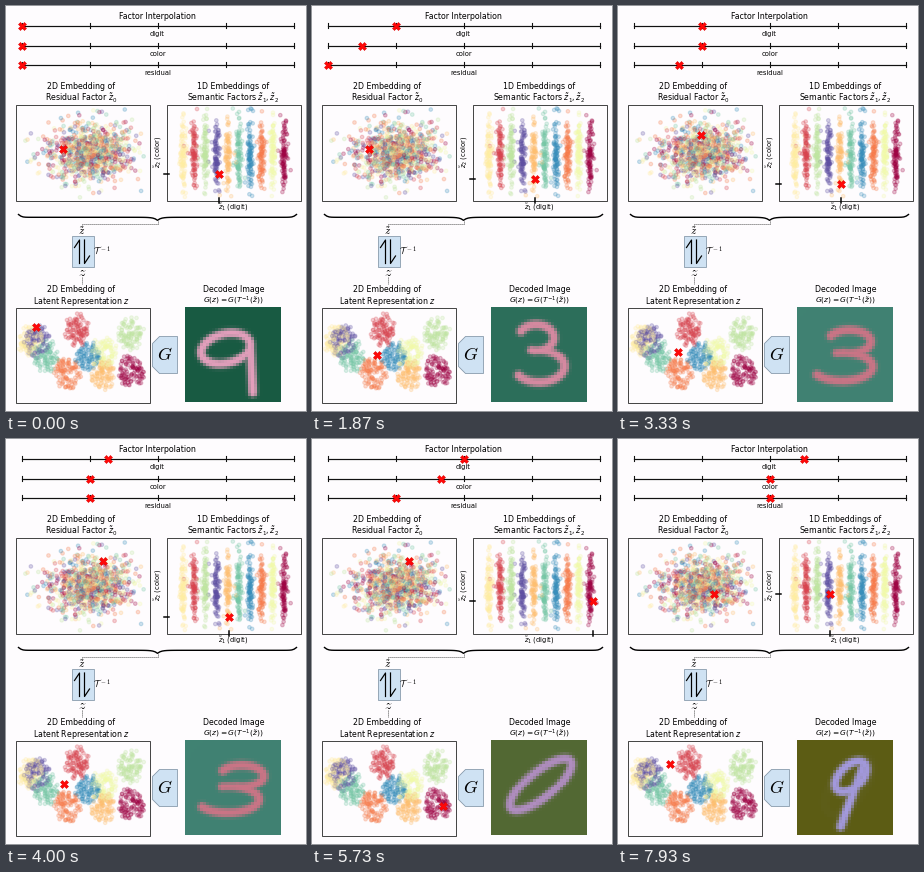
Animation of 300 by 405 pixels, one loop 8000 ms. Source, as a matplotlib script:

```python
import numpy as np
import matplotlib.pyplot as plt
from matplotlib.animation import FuncAnimation
from matplotlib.patches import Polygon, Rectangle

W, H, DPI = 300, 405, 100
FRAMES, LOOP = 120, 8000
STEPS = 18                       # frames per slider segment
PT = 72 / DPI                    # points per pixel
PAPER, INK = "#fefcfe", "#111111"

rng = np.random.default_rng(4)
fig = plt.figure(figsize=(W / DPI, H / DPI), dpi=DPI, facecolor=PAPER)
ax = fig.add_axes([0, 0, 1, 1])
ax.axis("off")


def text(x, y, s, px=7.85, **kw):
    kw = {"ha": "center", "va": "center", "color": "black", **kw}
    return ax.text(x, y, s, fontsize=px * PT, family="DejaVu Sans", **kw)


def line(xs, ys, lw=1.0, color=INK, **kw):
    return ax.plot(xs, ys, color=color, lw=lw * PT, **kw)[0]


def dots(x, y, labels, box):
    x0, y0, x1, y1 = box
    ok = (x > x0 + 3) & (x < x1 - 3) & (y > y0 + 3) & (y < y1 - 3)
    order = rng.permutation(np.flatnonzero(ok))
    ax.scatter(x[order], y[order], s=(3.6 * PT) ** 2, c=labels[order],
               cmap="Spectral", alpha=0.25, linewidths=1.1 * PT, zorder=2)
    ax.add_patch(Rectangle((x0, y0), x1 - x0, y1 - y0, fill=False,
                           ec="#333333", lw=0.9 * PT, zorder=4))


def cross(x=0, y=0):
    return ax.plot([x], [y], marker="X", ms=8.2 * PT, mfc="#ff0808",
                   mec="#e00000", mew=0.5 * PT, ls="none", zorder=8)[0]


# sliders
ROWS = (19, 39, 58)
text(151, 10, "Factor Interpolation")
for y, name in zip(ROWS, ("digit", "color", "residual")):
    line([15, 287], [y, y], 1.2)
    for t in range(15, 288, 68):
        line([t, t], [y - 2.5, y + 2.5], 1.1)
    text(151, y + 8.2, name, 6.8)

# scatter plots
N = 100
labels = np.repeat(np.arange(10), N)


def normal(sd, tail=0.0, wide=1.0):
    """Gaussian noise in which a share of the points spreads wider."""
    scale = np.where(rng.random(10 * N) < tail, wide, 1)
    return sd * scale * rng.normal(size=10 * N)


text(75, 80, "2D Embedding of")
text(75, 91.5, r"Residual Factor $\tilde{z}_0$")
dots(84 + normal(19, 0.25, 1.7), 146 + normal(13, 0.25, 1.6), labels,
     (9, 98, 143, 194))

text(227, 80, "1D Embeddings of")
text(227, 91.5, r"Semantic Factors $\tilde{z}_1, \tilde{z}_2$")
column = {d: 176.5 + 11.2 * k for k, d in enumerate("4169378250")}
dots(np.array([column[str(d)] for d in labels]) + normal(1.5, 0.03, 4),
     147 + normal(18.5), labels, (160, 98, 294, 194))
text(152, 145, r"$\tilde{z}_2$ (color)", 6.8, rotation=90)
text(227, 201, r"$\tilde{z}_1$ (digit)", 6.8)

text(75, 283, "2D Embedding of")
text(75, 294.5, r"Latent Representation $z$")
centers = np.array([(125, 365), (71, 324), (61, 367), (96, 369), (24, 334),
                    (97, 346), (124, 327), (39, 349), (82, 350), (30, 334)])
cx, cy = centers[labels].T
ang = rng.uniform(0, 2 * np.pi, 10 * N)
rad = np.sqrt(rng.random(10 * N)) * rng.uniform(0.8, 1.15, 10 * N)
dots(cx + 12.5 * rad * np.cos(ang), cy + 15.5 * rad * np.sin(ang), labels,
     (9, 301, 143, 396))

# brace and connectors
u = np.linspace(0, 139, 60)
half = 208 + 2.8 * np.tanh(u / 3.5) + 3 * np.exp((u - 139) / 3.5)
line(np.r_[12 + u, 290 - u[::-1]], np.r_[half, half[::-1]], 1.4, "black")
DOTTED = dict(lw=0.8, color="#555555", ls=(0, (1.5, 1)))
line([151, 151, 75.5, 75.5], [214, 217, 217, 220], **DOTTED)
line([75.5, 75.5], [270, 277], **DOTTED)
CM = dict(math_fontfamily="cm")
text(75.5, 225, r"$\tilde{z}$", 11, **CM)
text(75.5, 266, r"$z$", 14, **CM)
text(96, 244, r"$\mathcal{T}^{\,-1}$", 9, **CM)

# invertible map and generator
BLOCK = dict(fc="#cfe2f3", ec="#8497a8", lw=0.8 * PT)
ax.add_patch(Rectangle((65, 229.5), 22, 31, **BLOCK))
line([68, 73, 73], [241, 233.5, 257], 1.2, "black")
line([78, 78, 83], [233.5, 257, 249.5], 1.2, "black")
ax.add_patch(Polygon([(146, 337), (153, 330), (171, 330), (171, 367),
                      (153, 367), (146, 360)], **BLOCK))
text(158.5, 348.5, r"$G$", 18, **CM)

# decoded image
text(227, 283, "Decoded Image")
text(227, 294.5, r"$G(z) = G(T^{-1}(\tilde{z}))$", 7.5)
GRID = 32
X0, X1, Y0, Y1 = 178.5, 274, 300.5, 395.5
cell = (np.arange(GRID) + 0.5) / GRID
gx, gy = np.meshgrid(X0 + cell * (X1 - X0), Y0 + cell * (Y1 - Y0))


def arc(x, y, a, b, start=0, stop=360, tilt=0):
    t, r = np.radians(np.linspace(start, stop, 60)), np.radians(tilt)
    c, s = a * np.cos(t), b * np.sin(t)
    return np.column_stack([x + c * np.cos(r) - s * np.sin(r),
                            y + c * np.sin(r) + s * np.cos(r)])


def nine(x, y, a, b, tilt, end_x, end_y):
    loop = arc(x, y, a, b, tilt=tilt)
    return np.vstack([loop, np.linspace(loop[0], (end_x, end_y), 40)])


def three(x, y, w, h, lean):
    """Two bowls that meet at height y."""
    return np.vstack([
        arc(x + lean, y - 0.45 * h, 0.7 * w, 0.45 * h, -150, 105),
        arc(x - lean, y + 0.55 * h, w, 0.55 * h, -100, 145)])


def zero(x, y, a, b, tilt):
    return arc(x, y, a, b, tilt=tilt)


def ink(curve):
    d = np.hypot(gx[..., None] - curve[:, 0], gy[..., None] - curve[:, 1])
    return 1 / (1 + np.exp((d.min(-1) - 4.3) / 0.9))


def ramp(s, a, b):
    return min(max((s - a) / (b - a), 0), 1)


def ease(s, a, b):
    t = ramp(s, a, b)
    return t * t * (3 - 2 * t)


def blend(x, stops):
    """Linear path through equally spaced stops, x counted in stops."""
    return np.array([np.interp(x, range(len(v)), v) for v in zip(*stops)])


def digit_ink(s, color, residual):
    if s < 4:
        shape = ink(three(*blend(color + residual, [
            (225, 343, 21, 29, 0), (225, 345, 29, 29, -3),
            (228, 347, 31, 24, 7)])))
        first = ink(nine(219, 342, 25, 15, -14, 246, 386))
        shape = first + (shape - first) * ease(s, 0.2, 0.75)
        if s < 3:
            return shape
    ring = ink(zero(*blend(residual - 1, [(228, 345, 38, 13, -39),
                                          (230, 346, 34, 16, -54)])))
    if s < 4:
        return shape + (ring - shape) * ease(s, 3.28, 3.85)
    last = ink(nine(232, 337, 19, 11, -45, 222, 387))
    return ring + (last - ring) * ease(s, 6.1, 6.54)


GROUND = [(24, 90, 66), (64, 130, 114), (92, 92, 20)]
STROKE = [(230, 160, 190), (204, 116, 134), (165, 155, 226)]
COLOR_Y = [(167,), (177,), (154,)]
RESIDUAL = [(56, 142), (96, 121), (95, 154)]
JUMPS = [(0.4, 197), (0.85, 222), (3.45, 280), (6.3, 211)]
LATENT = np.array([(0.2, 29, 320), (0.75, 98, 346), (1.2, 66, 349),
                   (3.3, 57, 344), (3.7, 130, 366), (5, 130, 366),
                   (6.1, 119, 360), (6.55, 43, 320)])

picture = ax.imshow(np.zeros((GRID, GRID, 3)), extent=(X0, X1, Y1, Y0),
                    interpolation="nearest", aspect="auto", zorder=2)
knobs = [cross(15, y) for y in ROWS]
res_mark, sem_mark, lat_mark = cross(), cross(), cross()
tick_x = line([0, 0], [0, 0], 1.5, "black", zorder=5)
tick_y = line([0, 0], [0, 0], 1.5, "black", zorder=5)

# whole coordinates fall on pixel centres
ax.set_xlim(-0.5, W - 0.5)
ax.set_ylim(H - 0.5, -0.5)


def update(i):
    s = max(0, i - 1) / STEPS
    done = [sum(ramp(s, a, a + 1) for a in range(k, 9, 3)) for k in range(3)]
    for knob, d in zip(knobs, done):
        knob.set_xdata([15 + 68 * d])
    _, color, residual = done

    x, y = blend(residual, RESIDUAL)
    res_mark.set_data([x], [y])

    x, y = 212, blend(color, COLOR_Y)[0]
    for when, to in JUMPS:
        x += (to - x) * ease(s, when, when + 0.2)
    sem_mark.set_data([x], [y])
    tick_x.set_data([x, x], [191.5, 196])
    tick_y.set_data([157.5, 162], [y, y])

    x, y = (np.interp(s, LATENT[:, 0], LATENT[:, k]) for k in (1, 2))
    lat_mark.set_data([x], [y])

    v = digit_ink(s, color, residual)[..., None]
    ground, stroke = blend(color, GROUND), blend(color, STROKE)
    picture.set_data((ground + (stroke - ground) * v) / 255)
    return [*knobs, res_mark, sem_mark, lat_mark, tick_x, tick_y, picture]


anim = FuncAnimation(fig, update, frames=FRAMES, interval=LOOP / FRAMES,
                     repeat=True, repeat_delay=0, blit=False)
plt.show()
```
